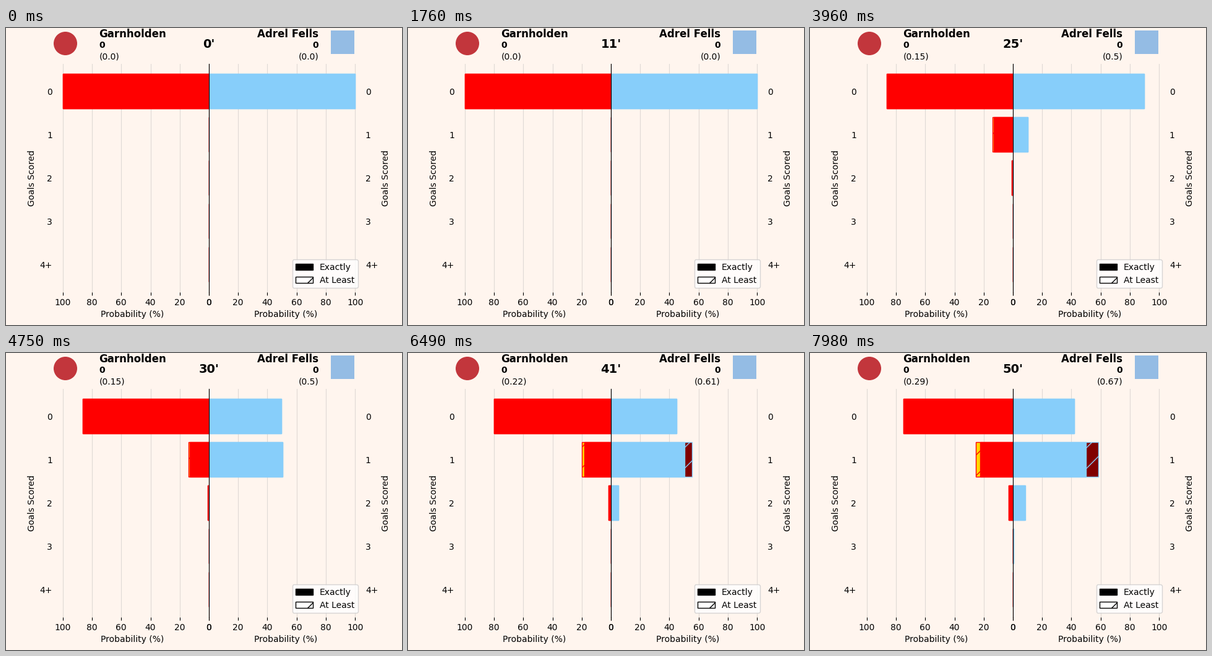
A matplotlib script that plays this animation: 640x480 px, repeating every 8 s.

```python
import matplotlib.pyplot as plt
import numpy as np
from matplotlib.animation import FuncAnimation
from matplotlib.patches import Circle, Patch, Rectangle

W, H = 640, 480
LOOP_MS, STEP_MS = 8000, 20
MINUTE_MS, TWEEN_MS, TWEEN_STEPS = 160, 30, 5
BACKGROUND = "#fff5ee"
GOALS = np.arange(5)
HOME, AWAY = 0, 1

# minute: (team, chance of scoring)
SHOTS = {
    12: (HOME, 0.015), 13: (HOME, 0.045), 16: (HOME, 0.05),
    20: (HOME, 0.0355), 25: (AWAY, 0.504), 32: (HOME, 0.072),
    38: (AWAY, 0.051), 40: (AWAY, 0.051), 45: (AWAY, 0.05),
    46: (HOME, 0.03), 48: (AWAY, 0.016), 50: (HOME, 0.0456),
}


def goal_odds(chances):
    """Percent chance of exactly and of at least 0, 1, 2, 3 and 4+ goals."""
    dist = np.array([1.0])
    for p in chances:
        dist = np.convolve(dist, [1 - p, p])
    dist = np.pad(dist, (0, 5))
    exact = np.append(dist[:4], dist[4:].sum())
    at_least = exact[::-1].cumsum()[::-1]
    at_least[0] = exact[0]
    return 100 * exact, 100 * at_least


def clock(ms):
    """Match minute and share of that minute's shot already shown."""
    minute, start = 0, 0
    while True:
        shot = minute in SHOTS
        length = TWEEN_MS * TWEEN_STEPS if shot else MINUTE_MS
        if ms < start + length:
            part = ((ms - start) // TWEEN_MS + 1) / TWEEN_STEPS if shot else 1
            return minute, part
        start += length
        minute += 1


def label(x, y, text, size=10, weight="normal", ha="left"):
    return fig.text(x / W, 1 - y / H, text, fontsize=size, fontweight=weight,
                    ha=ha, va="baseline")


plt.rcParams["font.family"] = "DejaVu Sans"
fig, axes = plt.subplots(1, 2, figsize=(W / 100, H / 100), dpi=100,
                         facecolor=BACKGROUND)
fig.subplots_adjust(left=0.125, right=0.9, bottom=0.11, top=0.88, wspace=0)

bars = []
for ax, color, accent in zip(axes, ("red", "lightskyblue"), ("gold", "maroon")):
    ax.set_facecolor(BACKGROUND)
    at_least = ax.barh(GOALS, 0 * GOALS, color=accent, edgecolor=color, hatch="/")
    exact = ax.barh(GOALS, 0 * GOALS, color=color, edgecolor=color)
    bars.append((exact, at_least))
    ax.set_ylim(4.64, -0.64)
    ax.set_xticks(range(0, 101, 20))
    ax.set_yticks(GOALS, ["0", "1", "2", "3", "4+"])
    ax.tick_params(axis="y", length=0)
    ax.set_axisbelow(True)
    ax.grid(axis="x", alpha=0.4)
    ax.set_xlabel("Probability (%)")
    ax.set_ylabel("Goals Scored")
    for side in ("top", "bottom", "left", "right"):
        ax.spines[side].set_visible(False)

left, right = axes
left.set_xlim(105, 0)
right.set_xlim(0, 105)
left.spines["right"].set_visible(True)
right.spines["left"].set_visible(True)
right.yaxis.tick_right()
right.tick_params(axis="y", length=0)
right.yaxis.set_label_position("right")
right.legend(handles=[
    Patch(facecolor="black", edgecolor="black", label="Exactly"),
    Patch(facecolor="white", edgecolor="black", hatch="/", label="At Least"),
], loc="lower right")

fig.add_artist(Circle((96, H - 25), 19, color="#c2363c", lw=0, transform=None))
fig.add_artist(Rectangle((525, H - 42), 38, 38, color="#94bce4", lw=0,
                         transform=None))
label(150, 15, "Garnholden", 12, "bold")
label(505, 15, "Adrel Fells", 12, "bold", "right")
label(150.5, 32, "0", 10, "bold")
label(505, 32, "0", 10, "bold", "right")
minute_text = label(328, 32, "", 14, "bold", "center")
xg_texts = [label(150.5, 50, ""), label(505, 50, "", ha="right")]


def update(frame):
    minute, part = clock(frame * STEP_MS + STEP_MS // 2)
    minute_text.set_text(f"{minute}'")
    for team in (HOME, AWAY):
        taken = [(m, p) for m, (who, p) in SHOTS.items()
                 if who == team and m <= minute]
        total = round(float(sum(p for _, p in taken)), 2)
        xg_texts[team].set_text(f"({total})")
        odds = goal_odds([p * part if m == minute else p for m, p in taken])
        for group, widths in zip(bars[team], odds):
            for bar, width in zip(group, widths):
                bar.set_width(width)
    return []


anim = FuncAnimation(fig, update, frames=LOOP_MS // STEP_MS, interval=STEP_MS,
                     init_func=lambda: update(0), repeat=True, repeat_delay=0)
plt.show()
```
